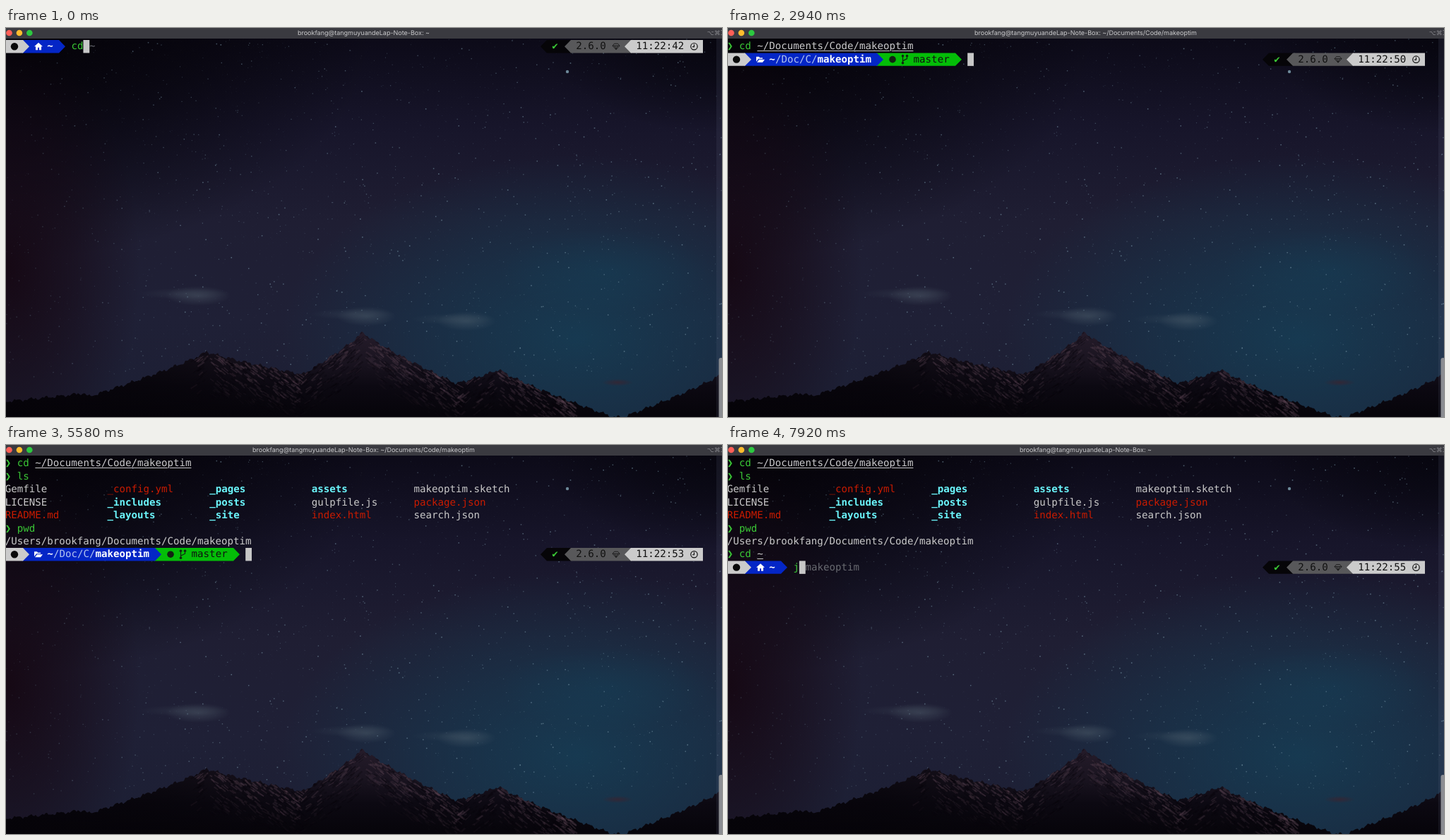
Write an HTML page with a canvas that moves like this. It is 1014x552 px and loops after 8000 ms.

```html
<!DOCTYPE html>
<html lang="en">
<head>
<meta charset="utf-8">
<title>Terminal</title>
<style>
html, body { margin: 0; width: 100%; height: 100%; overflow: hidden; background: #0a0815; }
#stage { position: absolute; left: 0; top: 0; width: 1014px; height: 552px; overflow: hidden; }
canvas, #text { position: absolute; left: 0; top: 0; width: 1014px; height: 552px; }
#text span {
  position: absolute; white-space: pre; line-height: 18.43px; text-rendering: geometricPrecision;
  font-family: "DejaVu Sans Mono", "DejaVu Sans", monospace; font-size: 14.135px; color: #c9c9c9;
}
#text .cmd { color: #3bc936; }
#text .bad { color: #c91b00; }
#text .dir { color: #6bf5fb; font-weight: bold; }
#text .arg { text-decoration: underline 1px; text-underline-offset: 2px; }
#text .hint { color: #686a70; }
#text .dark { color: #111; }
#text .bold { color: #fff; font-weight: bold; }
#text .path { color: #b3c3ef; }
#bar, #keys { position: absolute; top: 0; line-height: 15px; white-space: pre; }
#bar {
  left: 0; width: 1013px; text-align: center; color: #cacacc;
  font-family: Inter, "Open Sans", sans-serif; font-size: 9px; text-rendering: geometricPrecision;
}
#keys { left: 993px; color: #88888d; font: 8.6px/15px "DejaVu Sans", sans-serif; }
</style>
</head>
<body>
<div id="stage">
  <canvas id="sky" width="1014" height="552"></canvas>
  <canvas id="shapes" width="1014" height="552"></canvas>
  <div id="text"></div>
  <div id="bar"></div>
  <div id="keys">⌥⌘1</div>
</div>
<script>
const W = 1014, H = 552, LOOP = 8000;
const CELL = 8.51, LEFT = -1.2, ROW = 18.43, TOP = 17, TEXT_DROP = 0.42;
const $ = id => document.getElementById(id);
const sky = $('sky').getContext('2d');
const g = $('shapes').getContext('2d');
const colX = c => c * CELL + LEFT;
const rowY = r => TOP + r * ROW;

function rng(seed) {
  return () => (seed = (seed * 16807) % 2147483647) / 2147483647;
}

function disc(ctx, color, x, y, r) {
  ctx.fillStyle = color;
  ctx.beginPath();
  ctx.arc(x, y, r, 0, 7);
  ctx.fill();
}

function blend(x0, y0, x1, y1, ...colors) {
  const fade = sky.createLinearGradient(x0, y0, x1, y1);
  colors.forEach((c, i) => fade.addColorStop(i / (colors.length - 1), c));
  return fade;
}

function glow(x, y, rx, ry, rgb, alpha) {
  sky.save();
  sky.translate(x, y);
  sky.scale(rx, ry);
  const fade = sky.createRadialGradient(0, 0, 0, 0, 0, 1);
  fade.addColorStop(0, `rgba(${rgb},${alpha})`);
  fade.addColorStop(0.5, `rgba(${rgb},${alpha * 0.55})`);
  fade.addColorStop(1, `rgba(${rgb},0)`);
  sky.fillStyle = fade;
  sky.fillRect(-1, -1, 2, 2);
  sky.restore();
}

function drawStars() {
  const rand = rng(4711);
  for (let i = 0; i < 4200; i++) {
    const x = rand() * W, y = 15 + rand() * 480;
    const power = rand() ** 4, size = 0.7 + power * 0.9;
    const dim = Math.min(1, 0.35 + x / 500);
    sky.fillStyle = `rgba(125,155,172,${(0.1 + 0.5 * power) * dim})`;
    sky.fillRect(x, y, size, size);
  }
  disc(sky, 'rgba(150,190,205,.7)', 795, 62, 2.2);
}

// peaks: [x, y, left steepness, right steepness]
const PEAKS = [[110, 518, 0.22, 1], [284, 459, 0.83, 0.5], [505, 431, 1.39, 1.15],
  [698, 484, 0.63, 0.9], [W, 490, 0.93, 1]];

function ridge(x) {
  const rough = 1.5 * Math.sin(x * 0.31) + Math.sin(x * 0.83 + 1) + 0.7 * Math.sin(x * 1.9);
  return rough + Math.min(H, ...PEAKS.map(([px, py, l, r]) =>
    py + (x < px ? l : r) * Math.abs(x - px) ** 0.85));
}

function drawMountains() {
  sky.save();
  sky.beginPath();
  sky.moveTo(0, H);
  for (let x = 0; x <= W; x += 2) sky.lineTo(x, ridge(x));
  sky.lineTo(W, H);
  sky.clip();
  sky.fillStyle = blend(0, 435, 0, 545, '#241b29', '#1a1420', '#0c0912', '#07050b');
  sky.fillRect(0, 400, W, H);
  sky.fillStyle = blend(0, 0, 460, 0, 'rgba(5,3,8,.9)', 'rgba(5,3,8,.6)', 'rgba(5,3,8,0)');
  sky.fillRect(0, 400, 460, H);

  const rand = rng(99);
  for (let i = 0; i < 1300; i++) {
    const x = 270 + rand() * 530, depth = rand() ** 1.4 * 58;
    const side = Math.sign(ridge(x + 12) - ridge(x - 12));
    const y = ridge(x) + depth, len = 3 + rand() * 7;
    const lit = side > 0 ? rand() < 0.62 : rand() < 0.25;
    sky.strokeStyle = lit ? `rgba(88,66,80,${0.4 * (1 - depth / 62)})` : 'rgba(8,5,12,.3)';
    sky.lineWidth = 1 + rand() * 1.5;
    sky.beginPath();
    sky.moveTo(x, y);
    sky.lineTo(x + side * len, y + len * (0.5 + rand() * 0.5));
    sky.stroke();
  }
  sky.restore();
}

function drawSky() {
  sky.fillStyle = blend(0, 0, 0, H, '#0b0916', '#17152a', '#1f1e33', '#1f2036', '#1c1f34');
  sky.fillRect(0, 0, W, H);
  glow(810, 440, 420, 260, '20,66,90', 0.75);
  glow(850, 345, 150, 60, '18,75,100', 0.25);
  glow(0, 0, 520, 330, '4,2,7', 1);
  glow(0, 340, 190, 330, '21,7,18', 0.95);
  glow(W, 0, 260, 150, '6,5,13', 0.9);
  drawStars();
  for (const [x, y, size] of [[272, 380, 46], [510, 409, 42], [652, 416, 42]]) {
    glow(x, y, size, 14, '92,108,120', 0.35);
    glow(x - 20, y - 3, size * 1.4, 8, '80,95,108', 0.2);
  }
  glow(866, 503, 22, 5, '52,38,52', 0.9);
  drawMountains();
  sky.fillStyle = 'rgba(110,115,150,.13)';
  sky.fillRect(1006, 15, 8, H);
  sky.fillStyle = '#8b8d92';
  sky.beginPath();
  sky.roundRect(1009.5, 468, 6, 90, 3);
  sky.fill();
  sky.fillStyle = '#3a3a40';
  sky.fillRect(0, 0, W, 15);
  ['#ff5f57', '#febc2e', '#2cc840'].forEach((c, i) => disc(sky, c, 4.5 + i * 14.4, 7, 4.3));
}

function put(row, col, str, cls = '') {
  const s = document.createElement('span');
  s.textContent = str;
  s.className = cls;
  s.style.left = colX(col) + 'px';
  s.style.top = rowY(row) + TEXT_DROP + 'px';
  $('text').append(s);
}

function cursor(row, col) {
  g.fillStyle = '#c7c7c7';
  g.fillRect(colX(col), rowY(row), CELL + 0.3, ROW);
}

// flat end at x0, pointed end at tip
function arrow(x0, tip, y, color) {
  const neck = tip - 9 * Math.sign(tip - x0);
  g.fillStyle = color;
  g.beginPath();
  g.moveTo(x0, y);
  g.lineTo(neck, y);
  g.lineTo(tip, y + ROW / 2);
  g.lineTo(neck, y + ROW);
  g.lineTo(x0, y + ROW);
  g.fill();
}

const draws = {
  house: [p => p.fill(new Path2D('M-6 0L0-5.5 6 0H4V5H1V1.5H-1V5H-4V0Z')), '#fff'],
  folder: [p => p.fill(new Path2D('M-6 3V-4H-2L-1-2.5H3V-1H-3ZM-2 0H6L3 4H-5Z')), '#fff'],
  branch: [p => {
    p.stroke(new Path2D('M-3-4V5M-3 2L3-1V-4'));
    for (const [x, y] of [[-3, -5], [-3, 5], [3, -5]]) disc(p, '#122412', x, y, 1.8);
  }, '#122412'],
  gem: [p => p.stroke(new Path2D('M-5-1L-2.5-4H2.5L5-1 0 4.5ZH5M-2-1L0 4 2-1')), '#111'],
  clock: [p => {
    p.stroke(new Path2D('M0-3V.5H-2.5'));
    p.beginPath();
    p.arc(0, 0, 4.7, 0, 7);
    p.stroke();
  }, '#111']
};

function icon(name, x, y) {
  const [paint, color] = draws[name];
  g.save();
  g.translate(x, y);
  g.fillStyle = g.strokeStyle = color;
  g.lineWidth = name === 'gem' ? 0.8 : 1.2;
  paint(g);
  g.restore();
}

function leftPrompt(p) {
  const y = rowY(p.row), m = y + ROW / 2;
  if (!p.home) arrow(210, 331, y, '#04bd08');
  arrow(23, p.home ? 84 : 220, y, '#0426c6');
  arrow(0, 33, y, '#cbcbcb');
  disc(g, '#0a0a0a', 12, m, 5.2);
  icon(p.home ? 'house' : 'folder', 46, m);
  put(p.row, 7, '~', 'bold');
  if (p.home) return;
  put(p.row, 8, '/Doc/C/', 'path');
  put(p.row, 15, 'makeoptim', 'bold');
  disc(g, '#122412', 233, m, 4.8);
  icon('branch', 250.5, m);
  put(p.row, 31, 'master', 'dark');
}

function rightPrompt(p) {
  const y = rowY(p.row), m = y + ROW / 2;
  arrow(801, 757, y, '#060508');
  arrow(886, 791, y, '#58585a');
  arrow(987, 876, y, '#cbcbcb');
  put(p.row, 91, '✔', 'cmd');
  put(p.row, 95, '2.6.0', 'dark');
  icon('gem', 864, m);
  put(p.row, 105, '11:22:' + p.sec, 'dark');
  icon('clock', 974.5, m);
}

const REPO = '~/Documents/Code/makeoptim';
const HOST = 'brookfang@tangmuyuandeLap-Note-Box: ';
const KNOWN = ['cd', 'l', 'ls', 'pwd', 'j'];

const LISTING = [
  'Gemfile _config.yml! _pages/ assets/ makeoptim.sketch',
  'LICENSE _includes/ _posts/ gulpfile.js package.json!',
  'README.md! _layouts/ _site/ index.html! search.json'
];

function listFiles(row) {
  LISTING.forEach((line, r) => line.split(' ').forEach((name, c) => {
    const cls = { '/': 'dir', '!': 'bad' }[name.at(-1)];
    put(row + r, c * 17, cls ? name.slice(0, -1) : name, cls);
  }));
}

// keys: when each character is typed; accept: when the suggestion is taken
const PROMPTS = [
  { row: 0, home: true, sec: 42, from: 0, enter: 2700, cmd: 'cd ' + REPO, title: 'cd ' + REPO,
    keys: [0, 0, 60, 480, 720, 1080, 1560], accept: 2280,
    hint: n => n < 5 ? 'cd ~' : 'cd ' + REPO },
  { row: 1, sec: 50, from: 2820, enter: 4260, cmd: 'ls', title: 'ls -G',
    keys: [3600, 3840], hint: () => 'ls', output: listFiles },
  { row: 5, sec: 52, from: 4380, enter: 5520, cmd: 'pwd', keys: [5040, 5160, 5280],
    output: row => put(row, 0, '/Users/brookfang/Documents/Code/makeoptim') },
  { row: 7, sec: 53, from: 5580, enter: 6960, cmd: 'cd ~', title: 'cd ~',
    keys: [6000, 6300, 6600, 6780], hint: () => 'cd ' + REPO },
  { row: 8, home: true, sec: 55, from: 7080, enter: Infinity, cmd: 'j',
    keys: [7920], hint: () => 'j makeoptim' }
];

function command(row, col, str) {
  const [word, ...rest] = str.split(' ');
  put(row, col, word, KNOWN.includes(word) ? 'cmd' : 'bad');
  if (rest.length) put(row, col + word.length + 1, rest.join(' '), 'arg');
}

function editLine(p, t) {
  const col = p.home ? 11 : 40;
  const n = t >= p.accept ? p.cmd.length : p.keys.filter(k => k <= t).length;
  cursor(p.row, col + n);
  if (!n) return;
  command(p.row, col, p.cmd.slice(0, n));
  const rest = p.hint ? p.hint(n).slice(n) : '';
  if (rest) {
    put(p.row, col + n, rest[0], 'dark');
    put(p.row, col + n + 1, rest.slice(1), 'hint');
  }
}

function draw(t) {
  g.clearRect(0, 0, W, H);
  $('text').replaceChildren();
  PROMPTS.forEach((p, i) => {
    if (t < p.from) return;
    const idle = HOST + (p.home ? '~' : REPO);
    if (t < p.enter) {
      $('bar').textContent = idle;
      leftPrompt(p);
      rightPrompt(p);
      editLine(p, t);
      return;
    }
    put(p.row, 0, '❯', 'cmd');
    command(p.row, 2, p.cmd);
    if (p.output) p.output(p.row + 1);
    const next = PROMPTS[i + 1];
    if (t < next.from) {
      $('bar').textContent = p.title || idle;
      cursor(next.row, 0);
    }
  });
}

const CHANGES = PROMPTS.flatMap(p => [p.from, p.enter, p.accept || 0, ...p.keys]);
let shown = -1;

function tick() {
  const t = performance.now() % LOOP;
  const step = Math.max(...CHANGES.filter(c => c <= t));
  if (step !== shown) draw(shown = step);
  requestAnimationFrame(tick);
}

drawSky();
tick();
</script>
</body>
</html>
```
